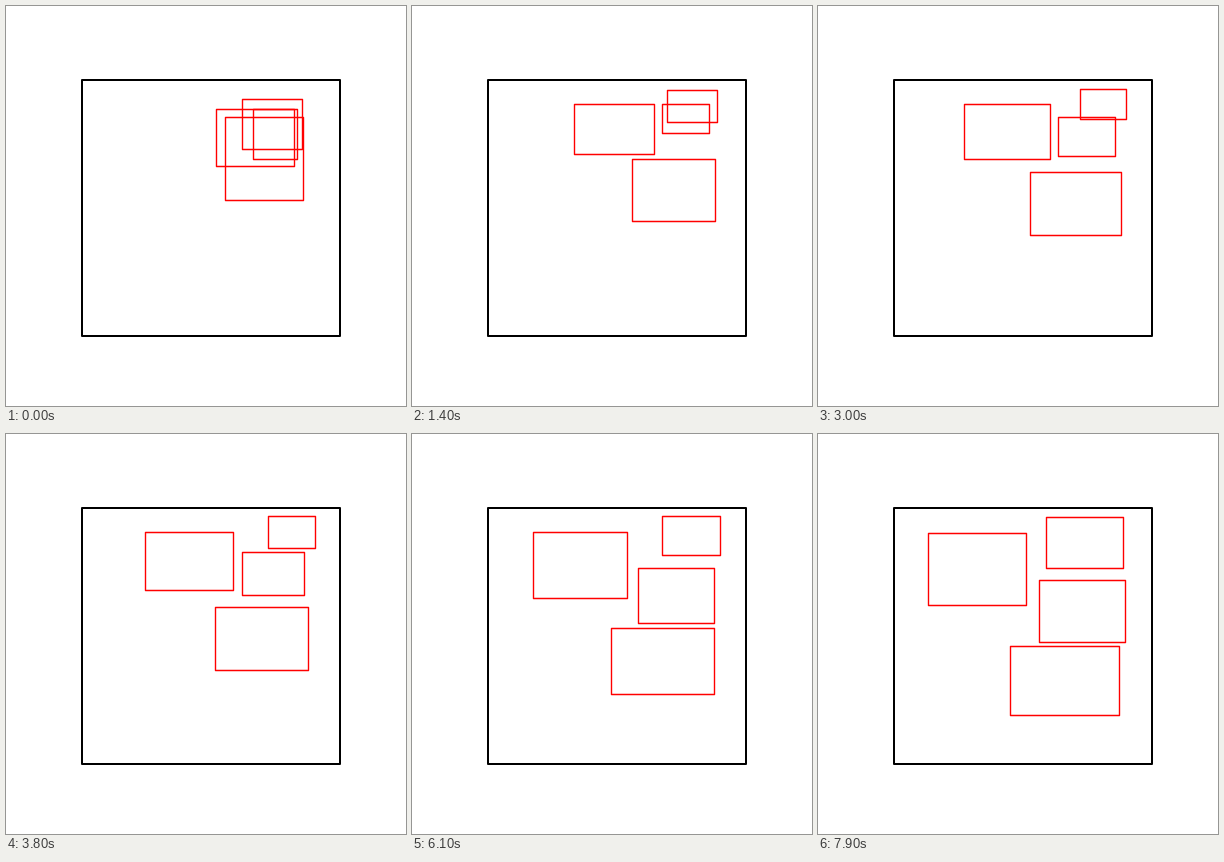
Write an HTML page that moves like this. It is 400 px wide and 400 px high and loops after 8 s.

```html
<!DOCTYPE html>
<html lang="en">
<head>
<meta charset="utf-8">
<title>Rectangles spreading apart</title>
<style>
  html, body { margin: 0; width: 100%; height: 100%; overflow: hidden; background: #fff; }
  svg { display: block; width: 100vw; height: 100vh; }
  rect { fill: none; stroke-linejoin: round; }
  .frame { stroke: #000; stroke-width: 2; }
  .box { stroke: #f00; stroke-width: 1.39; }
</style>
</head>
<body>
<svg viewBox="0 0 400 400">
  <rect class="frame" x="76" y="74" width="258" height="256"/>
  <rect class="box"/>
  <rect class="box"/>
  <rect class="box"/>
  <rect class="box"/>
</svg>
<script>
const LOOP = 8000, STEP = 100;
const APART = 1400, MID = 4900, END = 7900, DECAY = 600;

// Left, top, right, bottom of each box: overlapping, pushed apart, growing, grown.
const paths = [
  [[210, 103, 288, 160], [162, 98, 242, 148], [130, 98, 221, 160], [110, 99, 208, 171]],
  [[236, 93, 296, 143],  [255, 84, 305, 116], [259, 82, 309, 116], [228, 83, 305, 134]],
  [[247, 103, 291, 153], [250, 98, 297, 127], [231, 126, 299, 175], [221, 146, 307, 208]],
  [[219, 111, 297, 194], [220, 153, 303, 215], [204, 183, 302, 247], [192, 212, 301, 281]]
];
const boxes = document.querySelectorAll('.box');

// A fast push that dies away, complete at APART.
const push = t => (1 - Math.exp(-t / DECAY)) / (1 - Math.exp(-APART / DECAY));

// Smooth parabola through the three later poses.
function grow(a, b, c, t) {
  const early = (b - a) / (MID - APART);
  const late = (c - b) / (END - MID);
  const bend = (late - early) / (END - APART);
  return a + (t - APART) * (early + bend * (t - MID));
}

function edge([start, apart, mid, end], t) {
  return Math.round(t < APART
    ? start + (apart - start) * push(t)
    : grow(apart, mid, end, t));
}

function draw(t) {
  paths.forEach((poses, i) => {
    const [x1, y1, x2, y2] = poses[0].map((_, k) => edge(poses.map(p => p[k]), t));
    const place = { x: x1 + 0.5, y: y1 + 0.5, width: x2 - x1, height: y2 - y1 };
    for (const name in place) boxes[i].setAttribute(name, place[name]);
  });
}

function tick() {
  const t = performance.now() % LOOP;
  draw(Math.floor(t / STEP) * STEP);
  requestAnimationFrame(tick);
}
tick();
</script>
</body>
</html>
```
